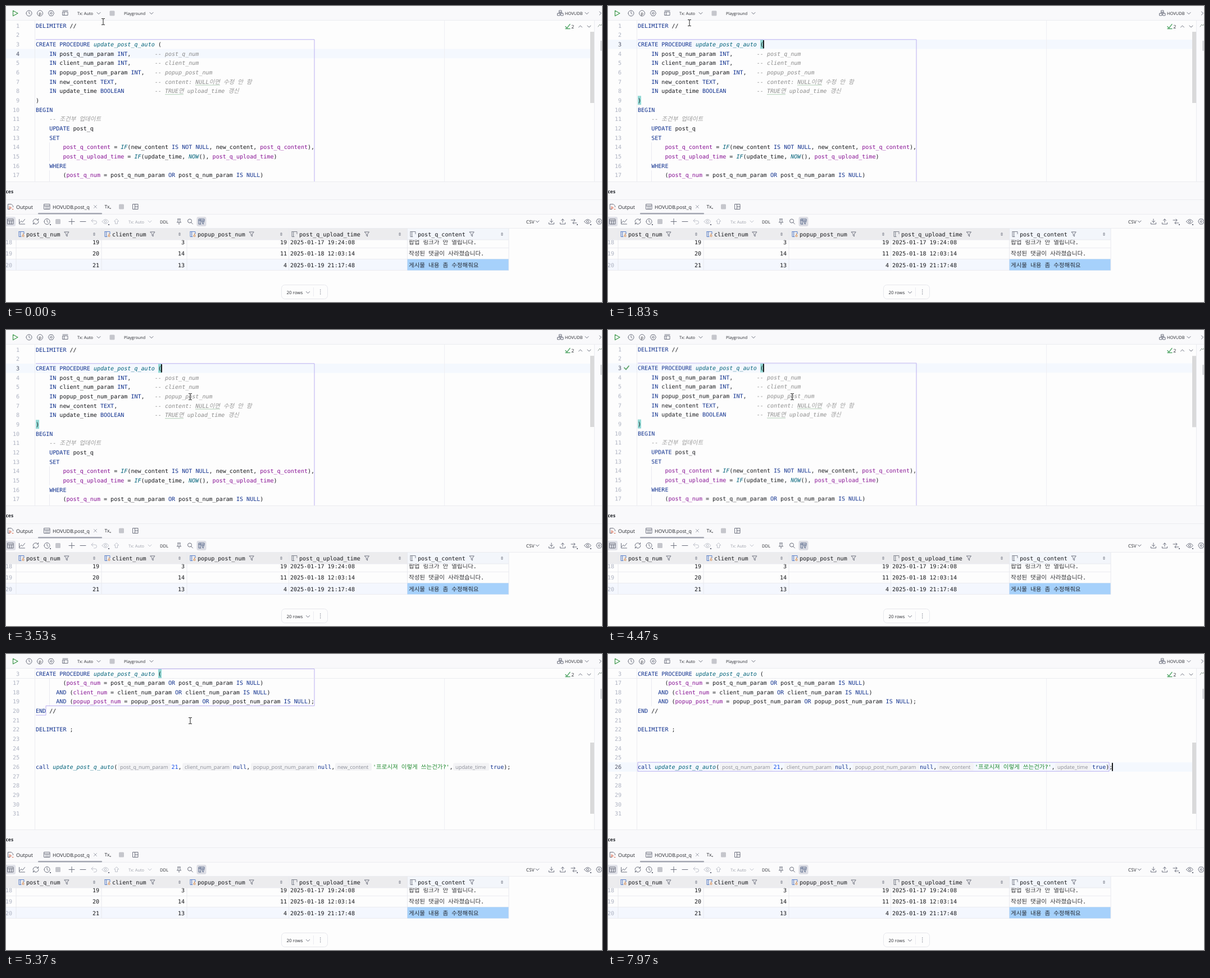
An HTML page that plays this animation: 1061x528 px, repeating every 8 s.

```html
<!DOCTYPE html>
<html lang="ko">
<head>
<meta charset="utf-8">
<title>SQL editor</title>
<style>
html, body { margin: 0; width: 100%; height: 100%; overflow: hidden; background: #fdfdfd; }
svg { display: block; }
text { white-space: pre; text-rendering: geometricPrecision; }
.m { font: 10.06px "DejaVu Sans Mono", "Noto Sans CJK KR", monospace; fill: #16171b; }
.u { font-family: "Open Sans", "Noto Sans", sans-serif; fill: #26282e; }
.ko { font: 300 10.5px "Noto Sans CJK KR", "Noto Sans CJK", sans-serif; fill-opacity: .88; }
.cm .ko, .cm { font-style: italic; fill: #8c8c8c; }
.fn { font-style: italic; fill: #00627a; }
.col { fill: #871094; }
.kw { fill: #10318f; }
.str { fill: #067d17; }
.num { fill: #1750eb; }
.ln { fill: #aeb3c2; }
.on { fill: #686d7e; }

/* one loop = 8 s, 1% = 80 ms */
.step { animation: 8s step-end infinite; }
.scroll { animation: scroll 8s ease-in-out infinite; }
.thumb { animation: thumb 8s ease-in-out infinite; }
.mouse { animation: mouse 8s ease-in-out infinite; }
.row4 { animation-name: row4; }
.stmt { animation-name: stmt; }
.row3 { animation-name: row3; }
.row26 { animation-name: row26; }
.caret3 { animation-name: caret3; }
.caret26 { animation-name: caret26; }
.popup { animation-name: popup; }
.done { animation-name: done; }
.sticky { animation-name: sticky; }
.arrow { animation-name: arrow; }
.beam { animation-name: beam; }
@keyframes scroll {
  0%, 55.69% { transform: translateY(0); }
  59.75%, 62% { transform: translateY(-150px); }
  65.6%, 100% { transform: translateY(-250px); }
}
@keyframes thumb {
  0%, 55.69% { transform: translateY(0); }
  59.75%, 62% { transform: translateY(67px); }
  65.6%, 100% { transform: translateY(112px); }
}
@keyframes mouse {
  0% { transform: translate(173px, 28px); }
  8.75%, 13.75% { transform: translate(300px, 69px); }
  22.88% { transform: translate(145px, 30px); }
  26.88%, 30% { transform: translate(17px, 13px); }
  33.38% { transform: translate(131px, 37px); }
  38.75%, 67.5% { transform: translate(328px, 119px); }
  79.4%, 87.5% { transform: translate(1034px, 196px); }
  92.5%, 100% { transform: translate(1075px, 196px); }
}
@keyframes row4 { 0% { opacity: 1; } 10% { opacity: 0; } }
@keyframes stmt { 0% { opacity: 1; } 86.25% { opacity: 0; } }
@keyframes row3 { 0% { opacity: 0; } 10% { opacity: 1; } 86.25% { opacity: 0; } }
@keyframes row26 { 0% { opacity: 0; } 86.25% { opacity: 1; } }
@keyframes caret3 {
  0%, 16.25%, 28.75%, 48.75%, 61.25% { opacity: 0; }
  10%, 22.5%, 42.5%, 55% { opacity: 1; }
}
@keyframes caret26 { 0%, 92.5% { opacity: 0; } 86.25%, 98.75% { opacity: 1; } }
@keyframes popup { 0% { opacity: 0; } 29.4% { opacity: 1; } 42.5% { opacity: 0; } }
@keyframes done { 0% { opacity: 0; } 46.5% { opacity: 1; } }
@keyframes sticky { 0% { opacity: 0; } 56.8% { opacity: 1; } }
@keyframes arrow { 0%, 32.5%, 42.5% { opacity: 0; } 24.4%, 36.9% { opacity: 1; } }
@keyframes beam { 0%, 32.5%, 42.5% { opacity: 1; } 24.4%, 36.9% { opacity: 0; } }
</style>
</head>
<body>
<script>
const CH = 6.056, PITCH = 16.66, LEFT = 53;
const PAGE = '#fdfdfd', BAR = '#f9f9fb';
const rowTop = n => 26.7 + (n - 1) * PITCH;
const baseline = n => rowTop(n) + 11.9;

const rect = (x, y, w, h, fill, extra = '') =>
  `<rect x="${x}" y="${y}" width="${w}" height="${h}" fill="${fill}" ${extra}/>`;
const line = (d, color = '#ebecf0', w = 1) =>
  `<path d="${d}" fill="none" stroke="${color}" stroke-width="${w}"/>`;
const icon = (x, y, d, color = '#6c707e', w = 1) =>
  `<path transform="translate(${x} ${y})" d="${d}" fill="none" stroke="${color}" stroke-width="${w}" stroke-linecap="round" stroke-linejoin="round"/>`;
const ui = (x, y, s, size, extra = '') =>
  `<text class="u" x="${x}" y="${y}" font-size="${size}" ${extra}>${s}</text>`;
const hangul = s => s.replace(/[가-힣]+/g, '<tspan class="ko">$&</tspan>');
const mono = (x, y, s, cls = '', extra = '') =>
  `<text class="m ${cls}" x="${x}" y="${y}" ${extra}>${s}</text>`;
const step = (name, body) => `<g class="step ${name}">${body}</g>`;

// SQL colouring
const kinds = ['cm', 'fn', 'col', 'kw', 'str', 'num'];
const syntax = new RegExp([
  '(--.*)',
  '\\b(update_post_q_auto|IF|NOW)\\b',
  '\\b(post_q_content|post_q_upload_time|post_q_num|client_num|popup_post_num)\\b',
  '\\b(DELIMITER|CREATE|PROCEDURE|IN|INT|TEXT|BOOLEAN|BEGIN|UPDATE|SET|IS|NOT|NULL|WHERE|OR|AND|END|call|null|true)\\b',
  "('[^']*')",
  '\\b(\\d+)\\b'
].join('|'), 'g');
const sql = s => s.replace(syntax, (hit, ...groups) => {
  const kind = kinds[groups.slice(0, 6).findIndex(Boolean)];
  return `<tspan class="${kind}">${hangul(hit)}</tspan>`;
});

const param = (decl, note) => ('    IN ' + decl).padEnd(35) + '-- ' + note;
const code = [
  'DELIMITER //',
  '',
  'CREATE PROCEDURE update_post_q_auto (',
  param('post_q_num_param INT,', 'post_q_num'),
  param('client_num_param INT,', 'client_num'),
  param('popup_post_num_param INT,', 'popup_post_num'),
  param('new_content TEXT,', 'content: NULL이면 수정 안 함'),
  param('update_time BOOLEAN', 'TRUE면 upload_time 갱신'),
  ')',
  'BEGIN',
  '    -- 조건부 업데이트',
  '    UPDATE post_q',
  '    SET',
  '        post_q_content = IF(new_content IS NOT NULL, new_content, post_q_content),',
  '        post_q_upload_time = IF(update_time, NOW(), post_q_upload_time)',
  '    WHERE',
  '        (post_q_num = post_q_num_param OR post_q_num_param IS NULL)',
  '      AND (client_num = client_num_param OR client_num_param IS NULL)',
  '      AND (popup_post_num = popup_post_num_param OR popup_post_num_param IS NULL);',
  'END //',
  '',
  'DELIMITER ;'
];
const callParts = [
  [53, 'call update_post_q_auto('], [294.5, '21,'], [404, 'null,'],
  [555, 'null,'], [653, "'프로시져 이렇게 쓰는건가?',"], [862, 'true);']
];
const hints = [
  [203, 86, 'post_q_num_param'], [318, 80, 'client_num_param'],
  [440, 110, 'popup_post_num_param'], [590, 57, 'new_content'], [800, 56, 'update_time']
];

const number = (n, cls = 'ln') => mono(24, baseline(n), n, cls, 'text-anchor="end"');
const rowBack = n => rect(0, rowTop(n), 1047, PITCH, '#f4f8fe') + line(`M51.5 ${rowTop(n)}v${PITCH}`);
const bracket = (x, n) => rect(x, rowTop(n) + .3, 6, 16, '#93d9d5');
const caret = (x, n) => rect(x, rowTop(n) + 1, 1.8, 14.6, '#000');
const violet = '#b9aef0';

function editor() {
  let texts = '';
  for (let n = 1; n <= 31; n++) texts += number(n);
  code.forEach((s, i) => { texts += mono(LEFT, baseline(i + 1), sql(s)); });
  const y26 = baseline(26);
  hints.forEach(([x, w, s]) => {
    texts += rect(x - 4, y26 - 10.5, w + 8, 13.5, '#f3f3f5', 'rx="2.5"') +
      ui(x, y26 - .4, s, 9.3, 'style="fill:#8c8f99"');
  });
  callParts.forEach(([x, s]) => { texts += mono(x, y26, sql(s)); });

  const typos = [[337, 44, 7], [283, 33, 8]].map(([x, w, n]) =>
    line(`M${x} ${baseline(n) + 2.5}h${w}`, '#a9c9ad', .9)).join('');
  const guides = [[14, 2], [17, 3]].map(([n, k]) =>
    line(`M77.5 ${rowTop(n)}v${k * PITCH}`, '#e4e5ec', .8)).join('');

  return `<g clip-path="url(#pane)"><g class="scroll">
    ${step('row4', rowBack(4))}
    ${step('row3', rowBack(3))}
    ${step('row26', rowBack(26))}
    ${step('popup', rect(LEFT, rowTop(3), 994, 18 * PITCH, '#c7c3fb'))}
    ${guides}${line('M780.5 0V800', '#eeeff4')}
    ${step('row3', bracket(271, 3) + bracket(53, 9))}
    ${texts}${typos}
    ${step('row4', number(4, 'on'))}
    ${step('row3', number(3, 'on'))}
    ${step('row26', number(26, 'on'))}
    ${step('stmt', line(`M53 ${rowTop(3) - .2}H549V${rowTop(20) - .8}H71V${rowTop(21) - .8}H53`, violet))}
    ${step('row26', line(`M53 ${rowTop(26)}H892v${PITCH - .6}H53z`, violet))}
    ${step('done', icon(33, rowTop(3) + 8, 'M-4 0l3 3l5-6', '#4c9a58', 1.7))}
    ${step('caret3', caret(276, 3))}
    ${step('caret26', caret(897, 26))}
  </g>
  ${step('sticky',
    rect(0, 26, 1047, 17.5, PAGE) + line('M0 43.5H1047') + line('M51.5 26v17') +
    step('stmt', bracket(271, 1) + line('M53 26.6H549V43.5', violet)) +
    mono(24, baseline(1), 3, 'ln', 'text-anchor="end"') + mono(LEFT, baseline(1), sql(code[2])))}
  </g>`;
}

// icon outlines, centred on 0,0
const I = {
  down: 'M-3-1.5l3 3l3-3', up: 'M-3 1.5l3-3l3 3', right: 'M-1.5-3l3 3l-3 3',
  circle: 'M-5 0a5 5 0 1 0 10 0a5 5 0 1 0-10 0', hands: 'M0-3V0l2 1.5',
  gear: 'M-2.5-4.5h5l2.5 4.5l-2.5 4.5h-5l-2.5-4.5zM-1.7 0a1.7 1.7 0 1 0 3.4 0a1.7 1.7 0 1 0-3.4 0',
  grid: 'M-5-4.5h10v9h-10zM-5-1.5h10M-1.7-1.5v6M1.7-1.5v6',
  layout: 'M-4.5-4.5h9v9h-9zM-1-4.5v9M-1 0h5.5',
  session: 'M-4.5-2.5h9v6h-9zM-4.5-4.8h9M-2-2.5v6',
  chart: 'M-5-4v8.5h10M-4 2l2.5-3l2.5 2l4-5',
  refresh: 'M-5 .5a5 5 0 0 1 9-3.2M5-.5a5 5 0 0 1-9 3.2M4.5-5v2.5h-2.5M-4.5 5v-2.5h2.5',
  plus: 'M-5 0h10M0-5v10', minus: 'M-5 0h10', close: 'M-2.5-2.5l5 5M2.5-2.5l-5 5',
  undo: 'M-2-4.5l-3 3l3 3M-5-1.5h6.5a3 3 0 0 1 0 6h-2',
  eye: 'M-6 0q6-8 12 0q-6 8-12 0M-2 0a2 2 0 1 0 4 0a2 2 0 1 0-4 0',
  arrowUp: 'M0-4.5l-4 4h2v4.5h4v-4.5h2z',
  pin: 'M-2.5-4.5h5M-1.7-4.5v4l-2 2h7.4l-2-2v-4M0 1.5v3.5',
  search: 'M-4.5-1a3.5 3.5 0 1 0 7 0a3.5 3.5 0 1 0-7 0M1.5 1.5l3 3',
  download: 'M0-4.5v6M-2.5-1l2.5 2.5l2.5-2.5M-4.5 2v2.5h9v-2.5',
  upload: 'M0 1.5v-6M-2.5-2l2.5-2.5l2.5 2.5M-4.5 2v2.5h9v-2.5',
  compare: 'M-5-2.5h7M0-4.5l2 2l-2 2M5 2.5h-7M0 .5l-2 2l2 2',
  funnel: 'M-4-4h8l-3 4v4l-2-1.5v-2.5z',
  filterBox: 'M-1 4.5h-4v-9h10v3M-5-2h10M-2-4.5v9M0 0h5l-1.8 2.2v2.5l-1.4-1v-1.5z',
  schema: 'M-5 0h4v4h-4zM1 0h4v4h-4zM-2-5h4v3h-4zM-3 0v-1h6v1',
  play: 'M-4-4.7L4.5 0L-4 4.7z'
};
const icons = (y, list) => list.map(([x, name, color]) => icon(x, y, I[name], color)).join('');
const stopBox = (x, y) => rect(x - 4.5, y - 4.5, 9, 9, '#c5c6cc', 'rx="1.5"');
const pale = '#bfc2cb';

function topBar() {
  return rect(0, 0, 1061, 26, BAR) + line('M0 25.5H1061') +
    icon(16.5, 13, I.play, '#3f9a4c', 1.2) +
    icons(13, [[41, 'circle'], [41, 'hands'], [60.5, 'circle'], [80.5, 'gear'], [105.5, 'session'],
      [165, 'down'], [259, 'down'], [987, 'schema'], [1034, 'down'], [1058, 'right']]) +
    ui(58.3, 15.6, 'p', 7.6) + stopBox(189, 13) +
    ui(127, 15.8, 'Tx: Auto', 7.4) + ui(210, 15.8, 'Playground', 7.2) + ui(995, 15.8, 'HOVUDB', 7.5);
}

function rightEdge() {
  return rect(1047, 26, 14, 287, '#fbfbfd') + line('M1047.5 26V313') +
    rect(1058, 62, 3, 18, '#d9dade') +
    icon(1000, 36.5, 'M-4 0l2.5 3l5.5-7M-4 4h8', '#55a76a', 1.3) + ui(1006.5, 40, '2', 8.5) +
    icons(36.5, [[1022.5, 'up'], [1038, 'down']]) +
    icon(1058, 35, 'M-4 2l3-4l2 2l3-4', '#8a9a90') +
    `<g class="thumb">${rect(1040, 46, 7, 127, '#d9d9da')}</g>` +
    step('popup', rect(1037, 60, 10.5, 127, '#8d8aa8') + rect(1040, 46, 7, 14, '#d9d9da'));
}

const columns = [
  [36, 'post_q_num', 157, 18], [189, 'client_num', 309, 170], [341, 'popup_post_num', 490, 322],
  [522, 'post_q_upload_time', 701, 503.5], [733, 'post_q_content', 883, 714.5]
];
const rows = [
  [424.8, 18, 19, 3, 19, '2025-01-17 19:24:08', '팝업 링크가 안 열립니다.'],
  [445, 19, 20, 14, 11, '2025-01-18 12:03:14', '작성된 댓글이 사라졌습니다.'],
  [465.5, 20, 21, 13, 4, '2025-01-19 21:17:48', '게시물 내용 좀 수정해줘요']
];

function grid() {
  const rule = '#e8e9ee';
  let out = rect(0, 452, 895, 19.5, '#f4f7fe') + line('M0 431.5H895M0 451.5H895M0 471.5H895');
  columns.forEach(([, , , edge]) => { out += line(`M${edge} 397V471.5`, rule); });
  out += rect(714.5, 451.5, 180.5, 20, '#a6d1fb');
  rows.forEach(([y, id, a, b, c, time, note]) => {
    out += mono(-1, y, id, 'ln') + mono(506, y, time) + mono(717, y, hangul(note));
    [[166, a], [318, b], [500, c]].forEach(([x, v]) => { out += mono(x, y, v, '', 'text-anchor="end"'); });
  });
  out += rect(0, 397, 895, 20, '#ececee') + rect(715, 397, 180, 20, '#f3f6fb');
  columns.forEach(([x, name, sort, edge], i) => {
    const tint = i < 3 ? '#5b80c9' : '#7b7f8b';
    out += icon(x - 8.5, 407, 'M-4.5-4.5h9v4M-4.5-4.5v9h4M-1.8-4.5v9', tint) +
      (i < 3 ? icon(x - 7, 410, 'M0 0a1.5 1.5 0 1 0 3 0a1.5 1.5 0 1 0-3 0M1.5-2v-2', '#d98a4a') : '') +
      mono(x, 410.5, name) + icon(x + name.length * CH + 11.5, 407, I.funnel) +
      icon(sort, 407, 'M-1.3-1.3l1.3-1.3l1.3 1.3zM-1.3 1.3l1.3 1.3l1.3-1.3z', '#6c707e', .8) +
      line(`M${edge} 397V417`, rule);
  });
  return out + line('M895 397V471.5M0 417H895', rule);
}

function services() {
  return rect(0, 313, 1061, 84, BAR) + rect(0, 372, 1061, 25, '#fbfbfc') +
    line('M0 313.5H1061M0 345.5H1061M0 371.5H1061M0 396.5H1061') +
    ui(-.5, 333.7, 'ces', 8.5, 'font-weight="700"') +
    icon(8, 358, 'M-4.5 4.5v-9h6l3 3v2M-1 4.5h-3.5') + icon(9.5, 360, 'M-3-2l3 2l-3 2zM1.5 2.5h2', '#d9694f') +
    ui(18, 361.8, 'Output', 9) + icon(73, 358, I.grid) + ui(83, 361.8, 'HOVUDB.post_q', 8.75) +
    icons(358, [[159, 'close', '#a3a6b0'], [230.5, 'layout']]) +
    ui(175.5, 361, 'Tx', 8.5) + icon(186, 361, 'M-1 0h1.5', '#26282e') + stopBox(205.5, 358) +
    rect(57, 369, 114, 2.5, '#a5a8b3', 'rx="1.2"') +
    rect(-2, 376, 19, 17, '#e0e1e8', 'rx="3"') + rect(339.5, 376, 17, 17, '#dcdde4', 'rx="3"') +
    icons(384.5, [[8, 'grid'], [28.5, 'chart'], [53, 'refresh'], [73, 'circle'], [73, 'hands'], [117, 'plus'],
      [137, 'minus'], [157, 'undo', pale], [177, 'eye', pale], [196.5, 'arrowUp', pale], [256, 'down', pale],
      [308, 'pin'], [328, 'search'], [348, 'filterBox', '#5f6f8f'], [946, 'down'],
      [971, 'download'], [991, 'upload'], [1011, 'compare'], [1035.5, 'eye'], [1056, 'gear']]) +
    stopBox(92.5, 384.5) + ui(218, 387.5, 'Tx: Auto', 7.4, 'style="fill:#9da0aa"') +
    ui(274, 387.5, 'DDL', 7.6) + ui(926, 387.5, 'CSV', 8.2) +
    [[78, 389], [182, 389], [1016, 389], [1040, 389]].map(([x, y]) => rect(x, y, 2, 2, '#6c707e')).join('') +
    grid() +
    rect(490.5, 497.5, 82, 25, PAGE, 'rx="6" stroke="#e6e7ec"') +
    ui(499.5, 513.5, '20 rows', 7.9) + icon(537.5, 511, I.down) + line('M547.5 502V518') +
    [506.5, 510, 513.5].map(y => rect(559, y - .6, 1.3, 1.3, '#6c707e')).join('');
}

function popup() {
  return rect(278, 77, 265, 85, '#fff', 'rx="6" filter="url(#shade)"') +
    '<path d="M278 149H543V156a6 6 0 0 1-6 6H284a6 6 0 0 1-6-6z" fill="#f6f6f9"/>' +
    ui(411, 96.3, 'Statements', 8.7, 'font-weight="700" text-anchor="middle"') +
    rect(283, 106.5, 254, 17.5, '#d2e1fd', 'rx="3"') +
    ui(289, 119, 'CREATE PROCEDURE update_post_q_auto ( IN post_q_nu...', 8.9) +
    ui(289, 137.2, 'DELIMITER // CREATE PROCEDURE update_post_q_auto (...', 8.9) +
    ui(280, 159.5, 'Customize', 8.8, 'style="fill:#3a5fc0"');
}

const mouse = `<g class="mouse">
  ${step('beam', icon(0, 0, 'M-2.5-5.5h1.7l.8.7l.8-.7h1.7M0-4.8v9.6M-2.5 5.5h1.7l.8-.7l.8.7h1.7', '#222'))}
  ${step('arrow', '<path d="M0 0v11l2.6-2.4l1.7 4l1.7-.7l-1.7-3.9h3.5z" fill="#fff" stroke="#222" stroke-width=".8"/>')}
</g>`;

document.body.innerHTML = `<svg width="1061" height="528" viewBox="0 0 1061 528">
  <defs>
    <clipPath id="pane"><rect y="26" width="1047" height="287"/></clipPath>
    <filter id="shade" x="-20%" y="-30%" width="140%" height="190%">
      <feDropShadow dx="0" dy="8" stdDeviation="8" flood-color="#25235a" flood-opacity=".33"/>
    </filter>
  </defs>
  ${rect(0, 0, 1061, 528, PAGE)}
  ${line('M51.5 26V313')}
  ${editor()}${rightEdge()}${topBar()}${services()}
  ${step('popup', popup())}
  ${mouse}
</svg>`;
</script>
</body>
</html>
```
